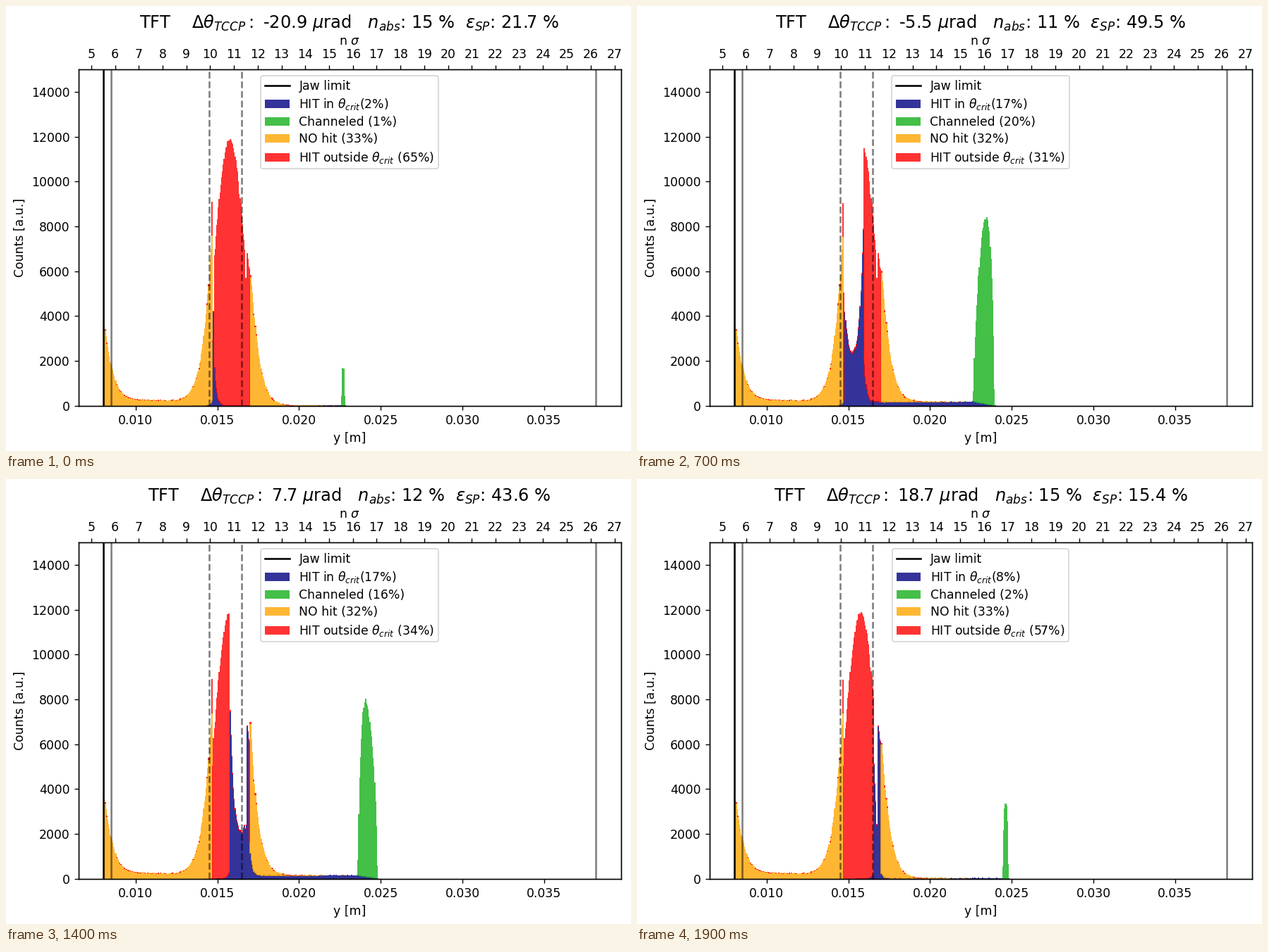
A matplotlib script that plays this animation: 886x632 px, repeating every 2000 ms.

```python
import numpy as np
import matplotlib.pyplot as plt
from matplotlib.animation import FuncAnimation
from matplotlib.lines import Line2D
from matplotlib.patches import Patch
from matplotlib.ticker import MultipleLocator

W, H, DPI = 886, 632, 124
COLORS = ["navy", "xkcd:green", "orange", "red"]
SIGMA = 1.456e-3
XLIM = np.array([0.0065, 0.0397])

# scan angles in microrad, with an extra step at zero
ANGLES = np.sort(np.append(-20.9 + 2.2 * np.arange(19), 0.0))

# key points against angle, in percent
KEYS = [-20.9, -16.5, -9.9, -1.1, 3.3, 12.1, 18.7]
IN_CRIT = [1.6, 6.4, 13.4, 21.2, 20.1, 14.7, 8.0]
CHANNELED = [0.6, 5.4, 16.4, 23.2, 21.9, 11.0, 2.2]
EFFICIENCY = [21.7, 40.9, 50.2, 48.7, 48.5, 38.7, 15.4]

# histogram bins and crystal geometry, in mm
STEP = 0.05
EDGES = 8 + STEP * np.arange(341)
Y = EDGES[:-1] + STEP / 2
C_LO, C_MID, C_HI = 14.7, 16.8, 17.0
HALF, KICK = 0.605, 7.945

rng = np.random.default_rng(4)
NOISE = rng.normal(size=Y.size)
SPECKS = rng.random(Y.size) < 0.3


def noisy(v):
    return np.maximum(v + 0.7 * np.sqrt(np.maximum(v, 0)) * NOISE, 0)


def falloff(d, peak, scale, power=1.0):
    """Decay for d >= 0, nothing before."""
    return np.where(d >= 0, peak * np.exp(-(np.abs(d) / scale) ** power), 0)


def hit_profile(y):
    core = 11850 * np.exp(-0.5 * ((y - 15.76) / 0.88) ** 2)
    core = np.where(y < C_LO + STEP, 5000, core)
    core = np.where((y > 16.7) & (y < C_MID), core * 0.87, core)
    core = np.where(y > C_MID, 6800 - 4200 * (y - C_MID), core)
    return np.where((y > C_LO) & (y < C_HI), core, 0)


def missed_profile(y):
    halo = falloff(y - 8, 3500, 0.56, 1.25) + 270 - 24 * (y - 9.5)
    left = np.where(y < C_LO, halo, 0) + falloff(C_LO - y, 7400, 0.55, 1.15)
    return left + falloff(y - C_HI, 5900, 0.55, 1.2)


HIT = noisy(hit_profile(Y))
MISSED = noisy(missed_profile(Y))


def kept_share(y, mid):
    u = np.abs(y - mid) / HALF
    keep = 0.23 + 0.5 * u ** 2.7
    return np.where((u < 1) & (y > C_LO) & (y < C_MID), keep, 1)


def layers(angle):
    mid = 15.757 + 0.0745 * angle
    lo, hi = max(mid - HALF, C_LO), min(mid + HALF, C_HI)
    inside = (Y > lo) & (Y < hi)

    src = Y - KICK
    green = 0.97 * hit_profile(src) * (1 - kept_share(src, mid))
    green = noisy(np.convolve(green, [0.2, 0.6, 0.2], "same"))

    level = 8.5 * np.interp(angle, KEYS, CHANNELED)
    g_lo, g_hi = lo + KICK, min(mid + HALF, C_MID) + KICK
    flat = np.interp(Y, [hi, hi + 0.01, g_lo, g_hi + 0.1], [0, level, level, 0])
    amp = 2000 if mid + HALF < C_HI else 250
    tails = falloff(Y - hi, amp, 0.13) + falloff(lo - Y, 250, 0.13)
    blue = np.where(inside, HIT * kept_share(Y, mid), noisy(flat + tails))

    red = np.where(inside, 0.005 * HIT, np.maximum(HIT - blue, 0))
    red = red + np.where(SPECKS, 0.01 * MISSED, 0)
    if angle < -20 or angle > -9:
        red[np.argmin(np.abs(Y - (C_LO - STEP / 2)))] += 1500
    return blue, green, MISSED, red


def shares(angle):
    blue = np.interp(angle, KEYS, IN_CRIT)
    green = np.interp(angle, KEYS, CHANNELED)
    missed = 32 + 0.045 * abs(angle)
    return blue, green, missed, 100 - blue - green - missed


plt.rcParams["font.family"] = "DejaVu Sans"
fig = plt.figure(figsize=(7.1452, 5.0968), dpi=DPI, facecolor="white")
ax = fig.add_axes([102.8 / W, 64.3 / H, 768.8 / W, 477.4 / H])
top = ax.twiny()

steps = [ax.stairs(np.zeros(Y.size), EDGES / 1000, baseline=np.zeros(Y.size),
                   fill=True, color=c, alpha=0.8, antialiased=False)
         for c in COLORS]

ax.axvline(0.008, color="black", lw=1.5)
for pos, style in [(0.0085, "-"), (0.03818, "-"), (0.01451, "--"), (0.0165, "--")]:
    ax.axvline(pos, color="black", alpha=0.5, ls=style, lw=1.5)

ax.set_xlim(*XLIM)
ax.set_ylim(0, 15000)
ax.xaxis.set_major_locator(MultipleLocator(0.005))
ax.set_xlabel("y [m]")
ax.set_ylabel("Counts [a.u.]")
top.set_xlim(*(XLIM / SIGMA))
top.set_xticks(range(5, 28))
top.set_xlabel(r"n $\sigma$", labelpad=2.9)
title = ax.set_title("", fontsize=14)

LABELS = [r"HIT in $\theta_{crit}$(%.0f%%)", "Channeled (%.0f%%)",
          "NO hit (%.0f%%)", r"HIT outside $\theta_{crit}$ (%.0f%%)"]
handles = [Line2D([], [], color="black", lw=1.5)]
handles += [Patch(color=c, alpha=0.8, lw=0) for c in COLORS]
legend = ax.legend(handles, ["Jaw limit"] + [s % 0 for s in LABELS],
                   loc="upper center", labelspacing=0.36, borderpad=0.34)


def draw(i):
    angle = ANGLES[i]
    base = np.zeros(Y.size)
    for patch, part in zip(steps, layers(angle)):
        patch.set_data(base + part, EDGES / 1000, base)
        base = base + part
    for text, label, share in zip(legend.get_texts()[1:], LABELS, shares(angle)):
        text.set_text(label % share)
    absorbed = 11 + 0.0245 * abs(angle) ** 1.7
    eff = np.interp(angle, KEYS, EFFICIENCY)
    title.set_text(
        rf"TFT    $\Delta\theta_{{TCCP}}:$ {angle:.1f} $\mu$rad   "
        rf"$n_{{abs}}$: {absorbed:.0f} %  $\varepsilon_{{SP}}$: {eff:.1f} %")
    return [*steps, title, legend]


anim = FuncAnimation(fig, draw, frames=len(ANGLES), interval=100,
                     init_func=lambda: draw(0), repeat=True, repeat_delay=0)
plt.show()
```
